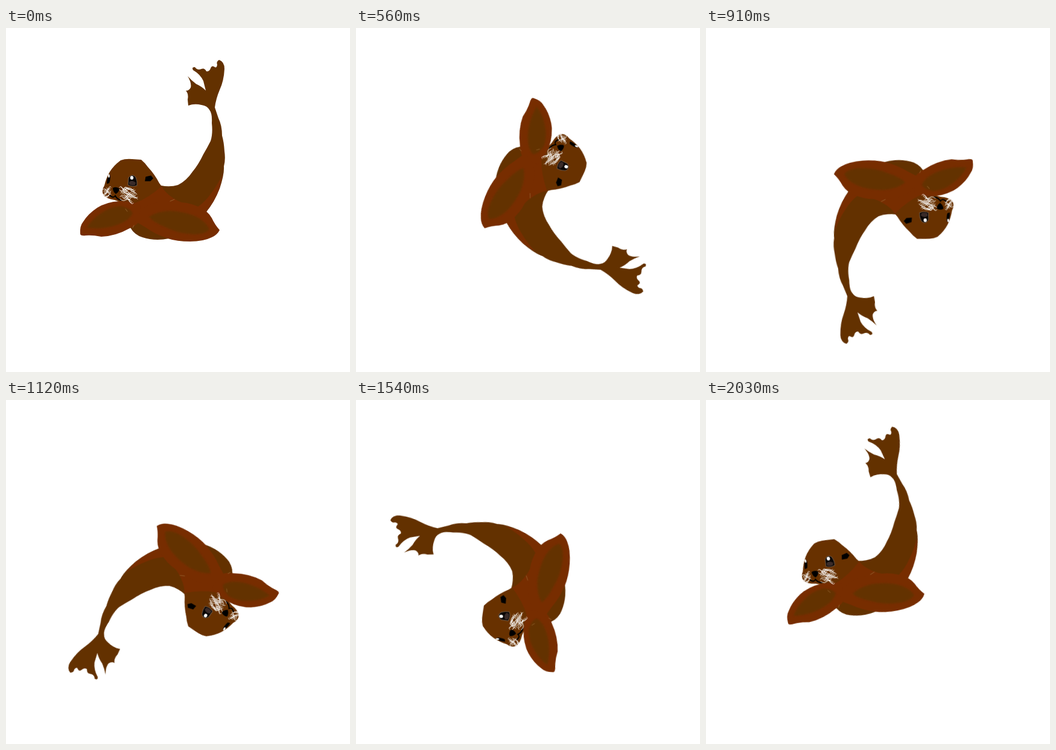
An HTML page that plays this animation: 570x572 px, repeating every 2.1 s.

```html
<!DOCTYPE html>
<html lang="en">
<head>
<meta charset="utf-8">
<title>Spinning seal</title>
<style>
  html, body { margin: 0; width: 100%; height: 100%; overflow: hidden; background: #fff; }
  svg { display: block; width: 100vw; height: 100vh; }
  #seal { transform-origin: 284.6px 287px; animation: spin 2100ms infinite; }
  /* Three stretches of equal 70 ms steps, each a little slower than the last. */
  @keyframes spin {
    0% { transform: rotate(0deg); animation-timing-function: steps(10, end); }
    33.3333% { transform: rotate(140deg); animation-timing-function: steps(5, end); }
    50% { transform: rotate(200deg); animation-timing-function: steps(15, end); }
    100% { transform: rotate(360deg); }
  }
  .dark { fill: #633100; }
  .red { fill: #772d00; }
  .head { fill: #683100; }
  .line { fill: none; stroke-linecap: round; }
</style>
</head>
<body>
<svg viewBox="0 0 570 572">
  <defs>
    <filter id="soft" x="-5%" y="-5%" width="110%" height="110%"><feGaussianBlur stdDeviation="0.7"/></filter>
    <filter id="paint" x="-10%" y="-10%" width="120%" height="120%"><feGaussianBlur stdDeviation="1.5"/></filter>
  </defs>
  <g id="seal">
    <g filter="url(#soft)">
      <!-- tail and body -->
      <path class="dark" d="M346 132 Q348 117 354 103 Q361 88 362 68 Q362 56 353 53 Q348 56 350 61 Q349 67 346 65
        Q341 61 339 67 Q337 73 332 72 Q329 66 324 68 Q317 71 313 65 Q307 65 310 70 Q322 77 327 88 L331 104
        Q324 97 315 93 Q307 87 301 80 Q308 92 306 99 Q303 105 298 104 Q303 110 301 119 L302 129
        Q312 125 324 128 Q333 129 337 136 Q342 142 341 158 Q343 176 339 188 Q334 198 327 210
        Q319 227 309 239 Q299 254 285 261 Q272 265 257 262 L250 290 L300 312 L331 307
        Q345 290 354 267 Q362 243 361 230 Q364 219 362 205 Q361 189 358 179 Q358 162 352 150 Z"/>
      <path class="red" d="M359 243 Q350 262 339 276 Q330 289 317 298 L331 306 Q346 289 354 266 Z"/>
      <path class="dark" d="M206 332 Q213 344 226 348 Q247 355 270 350 L290 335 L240 310 L212 318 Z"/>
      <!-- head -->
      <path class="head" d="M172 239 Q178 229 190 220 Q198 217 209 218 L224 219 Q230 224 235 231 Q247 244 254 258
        L260 266 L240 292 L200 292 Q188 289 180 286 Q166 284 161 277 Q158 270 163 262 Q166 249 172 239 Z"/>
      <!-- neck and flippers -->
      <path class="red" d="M258 263 Q263 275 284 287 L300 294 L250 335 L214 322 L198 304 L192 290 L214 291 Q237 282 258 263 Z"/>
      <path class="red" d="M123 342 Q122 329 128 322 Q136 309 151 299 Q167 289 188 288 Q208 288 222 294 L224 318
        Q216 329 205 333 Q182 346 158 347 Q143 344 132 345 Q123 346 123 342 Z"/>
      <path class="red" d="M230 298 Q246 287 270 290 Q297 288 316 296 Q334 303 341 316 Q346 327 354 336
        Q350 344 341 348 Q327 355 305 355 Q283 355 268 350 Q247 343 232 332 L212 320 Z"/>
    </g>
    <g class="dark" filter="url(#paint)">
      <path d="M134 332 Q142 318 156 309 Q172 297 191 296 Q207 300 210 308 Q205 319 188 326 Q163 336 134 332 Z"/>
      <path d="M237 314 Q252 304 273 304 Q303 306 321 317 Q333 325 337 335 Q330 343 312 343 Q285 342 264 331 Q246 324 237 314 Z"/>
    </g>
    <!-- face -->
    <g filter="url(#soft)">
      <path d="M232 248 L240 246 L243 250 L239 254 L231 254 Z" stroke="#000" stroke-width="1.5"/>
      <path d="M172 243 Q167 248 167 259 L171 258 Q174 250 172 243 Z"/>
      <path d="M177 266 Q182 263 188 267 Q188 272 182 276 Q177 272 177 266 Z"/>
      <path class="line" d="M172 278 Q177 284 181 279 Q185 286 191 286" stroke="#000" stroke-width="2"/>
    </g>
    <path d="M203 249 Q209 241 215 248 Q218 255 217 262 Q209 265 202 261 Z" fill="#090605" stroke="#8d7663" stroke-width=".7"/>
    <path d="M204 256 Q209 252 215 257 L214 261 Q208 263 204 260 Z" fill="#392b29"/>
    <ellipse cx="208.5" cy="249" rx="2.7" ry="3.1" fill="#fff"/>
    <ellipse cx="170.5" cy="246" rx="1.4" ry="3" fill="#fff"/>
    <path class="line" d="M272 288 L279 285 M198 301 L201 305 M210 332 L212 328" stroke="#9a6a38" stroke-width=".8"/>
    <path id="whiskers" class="line" stroke="#fff" stroke-width=".9"/>
  </g>
</svg>
<script>
  // A wavy strand from (x, y), reaching dx sideways and dy down.
  const strand = (x, y, dx, dy, bend) =>
    `M${x} ${y}q${dx * 0.25} ${bend} ${dx * 0.5} ${dy * 0.5}t${dx * 0.5} ${dy * 0.5}`;

  let d = '';
  for (let i = 0; i < 22; i++) {
    const row = i % 11;
    const x = 188 + (i * 5) % 13;
    d += strand(x, 265 + row * 1.9, 12 + (i * 7) % 10, 7 - (i * 3) % 10, i % 2 ? 5 : -4);
  }
  for (let i = 0; i < 12; i++) {
    d += strand(174 - (i * 3) % 5, 265 + i * 1.2, -7 - (i * 5) % 7, 1 + (i * 3) % 7, i % 2 ? 4 : -3);
  }
  document.getElementById('whiskers').setAttribute('d', d);
</script>
</body>
</html>
```
